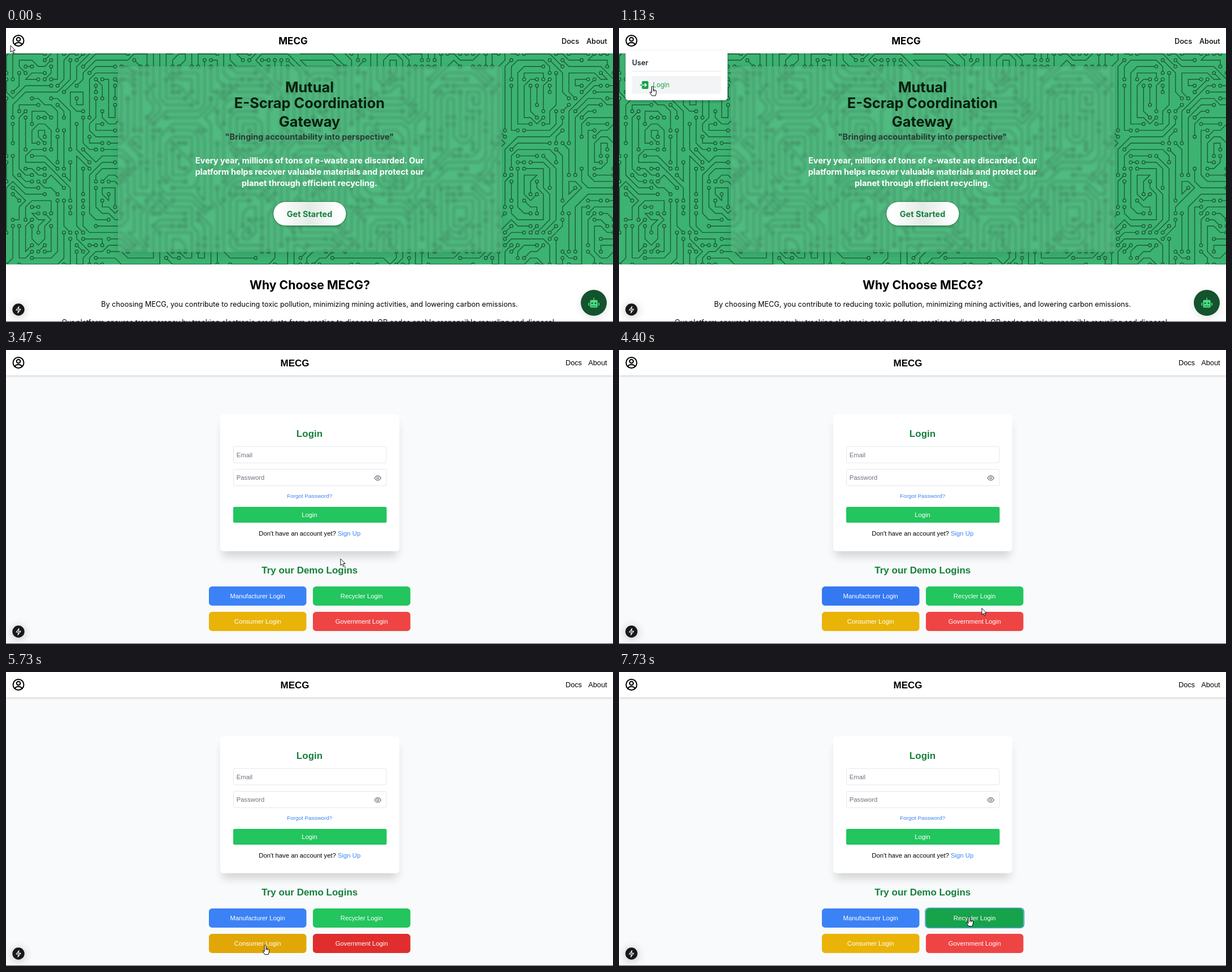
Recreate the animation shown at these times as an HTML page. Size 1074 by 521 pixels, loop 8 s.

```html
<!DOCTYPE html>
<html lang="en">
<head>
<meta charset="utf-8">
<title>Login walkthrough</title>
<style>
  html, body { margin: 0; width: 100%; height: 100%; overflow: hidden; background: #fff; }
  svg { display: block; width: 1074px; height: 521px; }
  text { font-size: 12.7px; }
  filter { color-interpolation-filters: sRGB; }
  #home { font-family: Inter, sans-serif; }
  #home .nav { font-weight: 500; }
  #login { font-family: "Liberation Sans", Arial, sans-serif; }
  #login text { font-size: 11.3px; }
  #login .brand, #login .head { font-size: 17px; }
  #login .nav { font-size: 12.7px; }
  .mid { text-anchor: middle; }
  .brand { font-size: 17px; font-weight: 700; }
  .title { font-size: 25.4px; font-weight: 700; fill: #06210f; }
  .lead { font-size: 14.5px; font-weight: 700; }
  .head { font-weight: 700; fill: #15803d; }
  .white { fill: #fff; }
  .link { fill: #3b82f6; }
  .hint { fill: #6b7280; }
  .field { fill: #fff; stroke: #e5e7eb; }
</style>
</head>
<body>
<svg viewBox="0 0 1074 521">
  <defs>
    <filter id="blur" x="-5%" y="-5%" width="110%" height="110%"><feGaussianBlur stdDeviation="2.8"/></filter>
    <filter id="soft" x="-100%" y="-100%" width="300%" height="300%"><feGaussianBlur stdDeviation="8"/></filter>
    <filter id="thin" x="-20%" y="-100%" width="140%" height="300%"><feGaussianBlur stdDeviation="2"/></filter>
    <clipPath id="hero"><path d="M0 45H1074V419H0z"/></clipPath>
    <clipPath id="panel"><rect x="198" y="68" width="679" height="329" rx="5"/></clipPath>
    <linearGradient id="pill">
      <stop offset=".08" stop-color="#fff"/><stop offset=".5" stop-color="#e3ebe6"/><stop offset=".92" stop-color="#fff"/>
    </linearGradient>
    <g id="person" fill="none" stroke="#000" stroke-width="2">
      <circle cx="22" cy="22.5" r="9.5"/><circle cx="22" cy="20" r="3.3"/>
      <path d="M15.5 29q2.2-3.2 6.5-3.2t6.5 3.2"/>
    </g>
    <g id="badge">
      <circle cx="22" cy="501" r="12" opacity=".2" filter="url(#soft)"/>
      <circle cx="22" cy="499" r="10.7" fill="#18181b"/>
      <path d="M23 493.5l-5 6.5h4l-1 5 5-6.7h-4z" fill="none" stroke="#fff" stroke-width="1.2" stroke-linejoin="round"/>
    </g>
  </defs>

  <g id="home">
    <g clip-path="url(#hero)">
      <g id="circuit">
        <path d="M0 45H1074V419H0z" fill="#3cb371"/>
        <g stroke="#1e5a39" stroke-width="1.4"><path id="wires" fill="none"/><path id="pads" fill="#3cb371"/></g>
      </g>
      <rect x="200" y="74" width="675" height="326" opacity=".13" filter="url(#soft)"/>
    </g>
    <g clip-path="url(#panel)">
      <use href="#circuit" filter="url(#blur)"/>
      <path d="M198 68H877V397H198z" fill="#fff" opacity=".1"/>
    </g>
    <path d="M0 41H1074V45H0z" opacity=".25" filter="url(#thin)"/>
    <path d="M0 0H1074V45H0z" fill="#fff"/>
    <use href="#person"/>
    <text class="mid brand" x="508" y="29">MECG</text>
    <text class="nav" x="983" y="27.6">Docs</text>
    <text class="nav" x="1063.5" y="27.6" text-anchor="end">About</text>

    <g class="mid">
      <text class="title" x="537" y="114">Mutual</text>
      <text class="title" x="537" y="142">E-Scrap Coordination</text>
      <text class="title" x="537" y="175">Gateway</text>
      <text class="lead" x="537" y="197.7" fill="#2c3a33">"Bringing accountability into perspective"</text>
      <g class="white">
        <text class="lead" x="537" y="240">Every year, millions of tons of e-waste are discarded. Our</text>
        <text class="lead" x="537" y="260">platform helps recover valuable materials and protect our</text>
        <text class="lead" x="537" y="280">planet through efficient recycling.</text>
      </g>
      <rect x="475" y="311" width="125" height="41" rx="20" opacity=".2" filter="url(#thin)"/>
      <rect x="472.7" y="307.6" width="129.4" height="43" rx="21.5" fill="url(#pill)" stroke="#15803d"/>
      <text class="lead" x="537" y="334.5" fill="#15803d">Get Started</text>
      <text x="537.5" y="463" style="font-size:21.2px;font-weight:700">Why Choose MECG?</text>
      <text x="537" y="494">By choosing MECG, you contribute to reducing toxic pollution, minimizing mining activities, and lowering carbon emissions.</text>
      <text x="536" y="525.5">Our platform ensures transparency by tracking electronic products from creation to disposal. QR codes enable responsible recycling and disposal.</text>
    </g>

    <circle cx="1040" cy="491" r="21" opacity=".15" filter="url(#soft)"/>
    <circle cx="1040" cy="487" r="23" fill="#14532d"/>
    <g fill="#4ade80">
      <path d="M1039.4 478h1.4v4h-1.4zM1030.3 487h1.8v5h-1.8zM1048.2 487h1.8v5h-1.8z"/>
      <rect x="1033.4" y="482" width="13.4" height="13.5" rx="2.2"/>
    </g>
    <path d="M1035.8 486.500h2.6v2.6h-2.6zM1041.8 486.500h2.6v2.6h-2.6zM1036 492h2v1.3h-2zM1039.1 492h2v1.3h-2zM1042.2 492h2v1.3h-2z" fill="#14532d"/>

    <g id="menu">
      <rect x="11.5" y="41" width="181" height="90" rx="6" opacity=".22" filter="url(#thin)"/>
      <rect x="11.5" y="39.5" width="180.5" height="88.5" rx="5.5" fill="#fff"/>
      <text x="23" y="65.5" font-weight="600" fill="#1f2937">User</text>
      <path d="M23 76.5H180" stroke="#e5e7eb"/>
      <rect x="23" y="85" width="157.5" height="31.5" rx="3" fill="#f3f4f6"/>
      <rect x="40.5" y="94" width="11.5" height="14" rx="2" fill="#16a34a"/>
      <path d="M37 101h4" stroke="#16a34a" stroke-width="1.5"/>
      <path d="M41 101h7.5m-3-3l3 3-3 3" stroke="#fff" stroke-width="1.5" fill="none"/>
      <text x="60" y="105" fill="#16a34a" style="font-size:11.3px">Login</text>
    </g>
  </g>

  <g id="login">
    <path d="M0 0H1074V521H0z" fill="#f9fafb"/>
    <path d="M0 41H1074V45.5H0z" opacity=".25" filter="url(#thin)"/>
    <path d="M0 0H1074V45H0z" fill="#fff"/>
    <use href="#person"/>
    <text class="mid brand" x="511" y="29">MECG</text>
    <text class="nav" x="990" y="27.3">Docs</text>
    <text class="nav" x="1063.5" y="27.3" text-anchor="end">About</text>

    <rect x="383" y="130" width="309" height="236" opacity=".15" filter="url(#soft)"/>
    <rect x="379" y="114" width="317" height="242.5" rx="5.6" fill="#fff"/>
    <rect class="field" x="402.5" y="171" width="270.5" height="29" rx="2.8"/>
    <rect class="field" x="402.5" y="211.5" width="270.5" height="29" rx="2.8"/>
    <text class="hint" x="407.7" y="189.5">Email</text>
    <text class="hint" x="407.7" y="230">Password</text>
    <g fill="none" stroke="#6b7280" stroke-width="1.2">
      <path d="M652 226.8q5.7-8.4 11.4 0q-5.7 8.4-11.4 0z"/><circle cx="657.7" cy="226.8" r="1.8"/>
    </g>
    <rect x="402" y="278" width="271.5" height="28" rx="2.8" fill="#22c55e"/>
    <g class="mid">
      <text class="head" x="537" y="153.5">Login</text>
      <text class="link" x="537.3" y="262.3" style="font-size:9.9px">Forgot Password?</text>
      <text class="white" x="537" y="295.5">Login</text>
      <text x="537.3" y="329.3">Don't have an account yet? <tspan class="link">Sign Up</tspan></text>
      <text class="head" x="537.3" y="396">Try our Demo Logins</text>
      <g id="buttons"></g>
    </g>
    <rect id="ring" x="542" y="418.2" width="174.5" height="35.3" rx="6.2" fill="none" stroke="#4b9bd8" stroke-width="1.6"/>
  </g>

  <use href="#badge"/>
  <path d="M0 520.5H1074" stroke="#30363d" stroke-width=".9"/>
  <g id="cursor" stroke-linejoin="round" fill="#fff" stroke="#000">
    <path id="arrow" d="M0 0V11.8L2.8 9.3 4.7 13.6 6.6 12.8 4.7 8.5H8.3z" stroke-width=".9"/>
    <path id="hand" d="M-1.5 9.5V1.4a1.5 1.5 0 0 1 3 0V6l4.3 1q1.6.4 1.4 2L6.6 13l-1 3.5H-.8L-4 11.6q-.9-1.7.5-2l2 1.9zM1.5 6v3M4 6.8v2.4"/>
  </g>
</svg>
<script>
const $ = id => document.getElementById(id);
const LOOP = 8000, STEP = 1000 / 15, FADE = 150, LOGIN_AT = 2130;

// Circuit board: traces run in nested bundles around block centres and never cross.
function drawCircuit() {
  const cols = 97, rows = 35, cell = 11.31, blockW = 11, blockH = 14;
  const dirs = [[1,0],[1,1],[0,1],[-1,1],[-1,0],[-1,-1],[0,-1],[1,-1]];
  const used = new Set(), diagonals = new Set();
  let seed = 11, wires = '', pads = '';
  const random = () => (seed = (seed * 16807) % 2147483647) / 2147483647;
  const key = (x, y) => x + ',' + y;

  // direction along an upright octagon round the centre of the block
  const field = (x, y) => {
    const column = Math.floor(x / blockW), v = y + 7 + column * 5;
    const dx = x % blockW - (blockW - 1) / 2, dy = v % blockH - (blockH - 1) / 2;
    const ax = Math.abs(dx), ay = Math.abs(dy);
    if (ax * 1.3 > ay) return 2;
    return ay > ax * 2.6 ? 0 : dx * dy > 0 ? 3 : 1;
  };
  const px = (x, y) => [0.7 + x * cell, 45.7 + y * cell];
  const pad = (x, y) => {
    const [u, v] = px(x, y);
    pads += `M${u - 2.8} ${v}a2.8 2.8 0 1 0 5.6 0a2.8 2.8 0 1 0-5.6 0`;
  };
  const isFree = (x, y, [dx, dy]) => {
    const u = x + dx, v = y + dy;
    return u >= 0 && u < cols && v >= -1 && v < rows - 1 && !used.has(key(u, v))
      && !(dx && dy && diagonals.has(key(x + u, y + v)));
  };

  for (let i = 0; i < cols * rows; i++) {
    const n = (i * 1009) % (cols * rows);
    let x = n % cols, y = Math.floor(n / cols) - 1;
    if (used.has(key(x, y))) continue;
    const trace = [[x, y]], length = 5 + random() * 11;
    let dir = field(x, y) + (random() < 0.5 ? 4 : 0);
    used.add(key(x, y));
    while (trace.length < length) {
      const axis = field(x, y), bend = (axis - dir + 8) % 4;
      const wanted = dir + (bend === 3 ? -1 : bend === 1 ? 1 : 0);
      const next = [0, 1, -1, 2, -2].map(k => (wanted + k + 8) % 8).find(d => isFree(x, y, dirs[d]));
      if (next === undefined) break;
      dir = next;
      const [dx, dy] = dirs[dir];
      if (dx && dy) diagonals.add(key(2 * x + dx, 2 * y + dy));
      x += dx;
      y += dy;
      used.add(key(x, y));
      trace.push([x, y]);
    }
    if (trace.length < 2) continue;
    wires += 'M' + trace.map(p => px(...p).join(' ')).join('L');
    pad(...trace[0]);
    pad(x, y);
  }
  $('wires').setAttribute('d', wires);
  $('pads').setAttribute('d', pads);
}

// hover: [start, end] pairs
const buttons = [
  { label: 'Manufacturer', x: 359, y: 419, from: [59,130,246], to: [37,99,235], hover: [[3860, 4300], [6220, 6465]] },
  { label: 'Recycler', x: 543, y: 419, from: [34,197,94], to: [22,163,74], hover: [[4470, 5430], [6475, LOOP]] },
  { label: 'Consumer', x: 359, y: 464, from: [234,179,8], to: [202,138,4], hover: [[5690, 6190]] },
  { label: 'Government', x: 543, y: 464, from: [239,68,68], to: [220,38,38], hover: [[5450, 5700]] }
];
$('buttons').innerHTML = buttons.map(b =>
  `<rect x="${b.x}" y="${b.y}" width="172.5" height="34" rx="5.6"/>
   <text class="white" x="${b.x + 86.2}" y="${b.y + 20.8}">${b.label} Login</text>`).join('');
const faces = $('buttons').querySelectorAll('rect');

// time, x, y of the pointer tip
const route = [
  [0, 8, 31], [70, 8, 31], [200, 4, 30], [470, 21, 18], [730, 21, 18], [1130, 59, 103.5],
  [2129, 59, 103.5], [2130, 57, 104], [2600, 57, 104], [2870, 400, 66], [3130, 780, 150],
  [3400, 592, 370], [3470, 592, 370], [3870, 500, 432], [4130, 510, 448], [4270, 598, 455],
  [4400, 642, 457.5], [4530, 660, 446], [5130, 638, 438], [5330, 638, 438], [5470, 600, 478],
  [5730, 459, 484], [5870, 445, 487], [6070, 445, 487], [6270, 480, 440], [6470, 618, 433],
  [6870, 618.5, 433.5], [7700, 618.5, 433.5], [7730, 619.5, 434], [LOOP, 619.5, 434]
];

const clamp = v => Math.max(0, Math.min(1, v));

function pointer(t) {
  const i = route.findIndex(p => p[0] > t), [t0, x0, y0] = route[i - 1], [t1, x1, y1] = route[i];
  const k = (t - t0) / (t1 - t0);
  return [x0 + (x1 - x0) * k, y0 + (y1 - y0) * k];
}

function overLink(t, x, y) {
  if (t < LOGIN_AT) return Math.hypot(x - 22, y - 22) < 11 || (x > 23 && y > 85);
  return buttons.some(b => x > b.x && x < b.x + 172.5 && y > b.y && y < b.y + 34);
}

const show = (id, on) => { $(id).style.display = on ? '' : 'none'; };

function draw(now) {
  const t = Math.min(LOOP - 1, Math.floor((now % LOOP + 5) / STEP) * STEP);
  const onLogin = t >= LOGIN_AT;
  show('home', !onLogin);
  show('login', onLogin);
  show('menu', t >= 395);
  show('ring', t >= 6930);
  buttons.forEach((b, i) => {
    const k = Math.max(...b.hover.map(([on, off]) => Math.min(clamp((t - on) / FADE), 1 - clamp((t - off) / FADE))));
    faces[i].setAttribute('fill', `rgb(${b.from.map((c, j) => Math.round(c + (b.to[j] - c) * k))})`);
  });
  const [x, y] = pointer(t), link = overLink(t, x, y);
  $('cursor').setAttribute('transform', `translate(${x} ${y})`);
  show('hand', link);
  show('arrow', !link);
  requestAnimationFrame(() => draw(performance.now()));
}

drawCircuit();
draw(performance.now());
</script>
</body>
</html>
```
